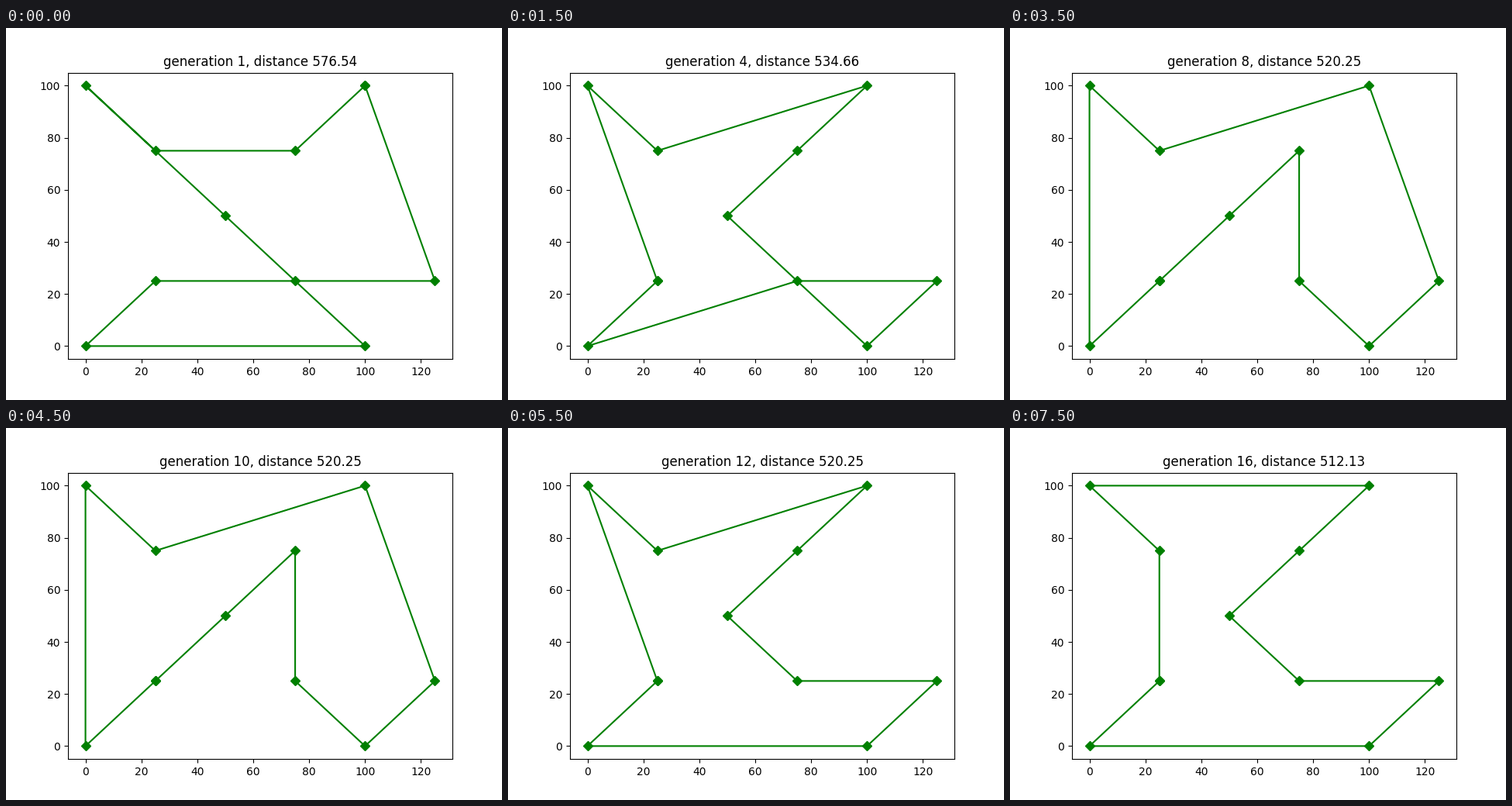
Recreate the animation shown at these times as a matplotlib script. Size 640 by 480 pixels, loop 8000 ms.

```python
from itertools import combinations

import numpy as np
import matplotlib.pyplot as plt
from matplotlib.animation import FuncAnimation

GENERATIONS = 16
GRID = 25
# cities in grid units, listed in the order of the first random tour
CITIES = GRID * np.array([(4, 4), (5, 1), (1, 1), (0, 0), (4, 0),
                          (3, 1), (2, 2), (0, 4), (1, 3), (3, 3)])


def closed_path(tour):
    return CITIES[tour + tour[:1]]


def length(tour):
    return np.hypot(*np.diff(closed_path(tour), axis=0).T).sum()


def mutate(tour, **moves):
    """Move single cities, given as c<city>=slot, one after the other."""
    tour = tour[:]
    for city, slot in moves.items():
        city = int(city[1:])
        tour.remove(city)
        tour.insert(slot, city)
    return tour


def two_opt(tour):
    """Reverse the one stretch that shortens the tour most."""
    cuts = combinations(range(1, len(tour) + 1), 2)
    return min((tour[:i] + tour[i:j][::-1] + tour[j:] for i, j in cuts),
               key=length)


# best tour, keyed by the generation in which it appears
best = {1: list(range(len(CITIES)))}
best[3] = mutate(best[1], c2=0, c3=1, c8=2, c7=9)
best[4] = mutate(best[3], c5=2, c0=8, c8=8)
best[8] = mutate(best[3], c7=2, c6=9)
best[12] = two_opt(best[4])
best[13] = two_opt(best[12])

fig, ax = plt.subplots(figsize=(6.4, 4.8), dpi=100)
line, = ax.plot(*closed_path(best[1]).T, "gD-")
title = ax.set_title("")


def update(i):
    generation = i + 1
    tour = best[max(g for g in best if g <= generation)]
    line.set_data(*closed_path(tour).T)
    title.set_text(f"generation {generation}, distance {length(tour):.2f}")
    return line, title


anim = FuncAnimation(fig, update, frames=GENERATIONS, interval=500,
                     init_func=lambda: update(0), repeat=True, repeat_delay=0)
plt.show()
```
